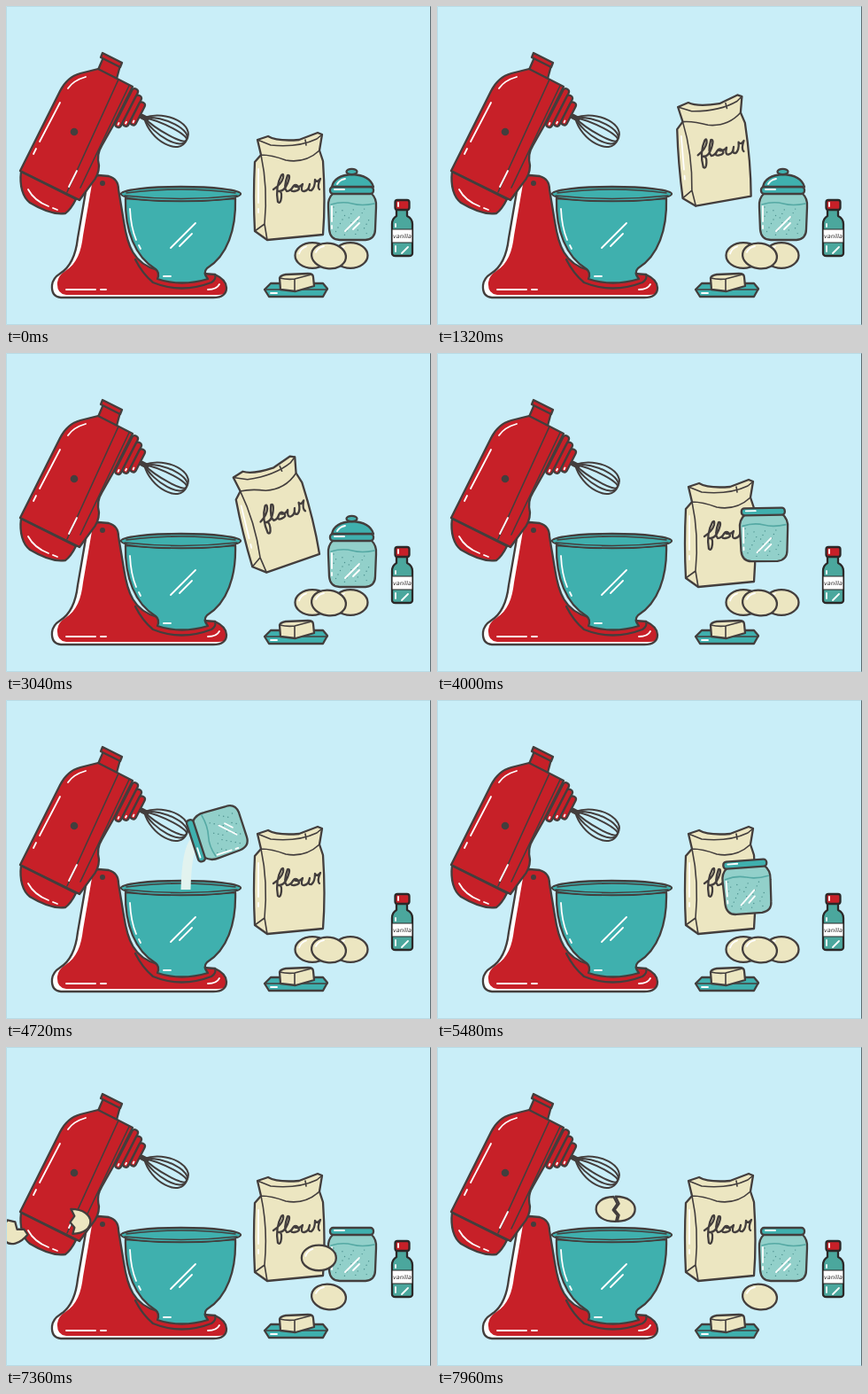
Write an HTML page that moves like this. It is 480 by 360 pixels and loops after 8 s.

```html
<!DOCTYPE html>
<html lang="en">
<head>
<meta charset="utf-8">
<title>Baking</title>
<style>
html, body { margin: 0; width: 100%; height: 100%; overflow: hidden; background: #c9eef8; }
svg { display: block; width: 100vw; height: 100vh; stroke: #433e3d; stroke-width: 2.3; stroke-linejoin: round; stroke-linecap: round; }
.red { fill: #c72028; }
.teal { fill: #3fb0ae; }
.pale { fill: #92d0ca; }
.cream { fill: #ece6c1; }
.line { fill: none; }
.thin { stroke-width: 1.6; }
.dark { fill: #433e3d; stroke: none; }
.shine { fill: none; stroke: #fff; stroke-width: 1.8; }
.plain { stroke: none; }
.stream { fill: none; stroke-width: 11; stroke-dasharray: 1 2; }
</style>
</head>
<body>
<svg viewBox="0 0 480 360">
  <defs>
    <path id="base" d="M91 204Q92 191 104 191L116 192Q127 195 127 207L133 243C137 270 144 291 171 298L236 303Q249 309 249 318Q249 329 234 329H62Q51 328 52 315Q53 307 61 302C74 294 79 280 81 262Z"/>
    <clipPath id="inBase"><use href="#base"/></clipPath>
    <clipPath id="aboveBowl"><path d="M0 0H480V214H0Z"/></clipPath>
    <g id="egg">
      <ellipse class="cream" rx="19.5" ry="14.3"/>
      <path class="shine" d="M-15 -2Q-13 -8 -7 -10"/>
    </g>
  </defs>

  <g id="mixer">
    <path class="red" d="M17 187C15 203 19 216 27 222C42 231 55 236 67 234Q73 230 79 218Z"/>
    <path class="shine" d="M25 207Q32 220 48 226M53 228L58 230"/>
    <use href="#base" fill="#fff" stroke="none"/>
    <g clip-path="url(#inBase)"><use href="#base" class="red plain" x="6" y="-3"/></g>
    <use href="#base" class="line"/>
    <path class="line" d="M146 286Q154 302 166 312Q198 325 232 312Q238 308 236 303"/>
    <path class="shine" d="M68 320H101M107 320H113M228 320Q238 320 241 314"/>
    <path class="red" d="M104 72L110 58L129 67L125 82Z"/>
    <path class="red" d="M104 71L143 91L121 135L108 158Q102 167 105 180Q105 191 97 200L83 219L16 186L61 96Q69 80 84 76Z"/>
    <path class="red" d="M109 53L131 64L129 69L107 58Z"/>
    <path class="line thin" d="M127 83L69 210M139 90L84 205M16 186L83 219"/>
    <path class="shine" d="M90 80Q76 84 70 93M61 109L38 153M34 161L31 167M71 204L80 186"/>
    <circle class="dark" cx="77" cy="142" r="4.3"/>
    <circle class="dark" cx="109" cy="200" r="3"/>
    <g id="knobs" transform="translate(133 113.5) rotate(27)"></g>
    <g id="whisk" class="line" transform="translate(156 126) rotate(28)" stroke-width="2">
      <path stroke-width="6" d="M-3 0H3"/>
    </g>
  </g>

  <g id="bowl">
    <ellipse class="teal" cx="197.500" cy="212" rx="67.500" ry="8"/>
    <path class="teal" d="M135 217C134 254 146 283 169 297Q174 301 171 308Q198 317 228 308Q222 301 227 296C250 282 260 252 259 217Q198 223 135 217Z"/>
    <path class="teal" d="M130 212C150 204 245 204 265 212Q263 220 198 220Q132 220 130 212Z" stroke="none"/>
    <path class="line thin" d="M130 212Q132 220 198 220Q263 220 265 212M134 214Q198 221 261 214"/>
    <path class="line thin" d="M136 211Q198 203 259 211"/>
    <path class="shine" d="M140 229Q141 250 147 264M150 270L152 274M178 305H186"/>
    <path class="shine" stroke-width="1" d="M186 273L214 245M196 271L210 257"/>
  </g>

  <g id="vanilla" stroke="#2b2828">
    <path fill="#4ba79d" d="M441 229V237Q436 240 436 246V279Q436 282 440 282H455Q459 282 459 279V246Q459 240 453 237V229Z"/>
    <path d="M436 252H459V267H436Z" fill="#fff" stroke-width="1.2"/>
    <rect class="red" x="439.500" y="219" width="16" height="11" rx="2.500"/>
    <path class="shine" d="M440 246V249M440 271V277M443 222V226M447 279L454 272"/>
    <text x="447.500" y="262" text-anchor="middle" font-family="'DejaVu Sans', sans-serif" font-size="6.400" font-style="italic" fill="#2b2828" stroke="none">vanilla</text>
  </g>

  <g id="butter">
    <path class="teal" d="M292 320L299 313H358L363 319L358 328H297Z"/>
    <path class="line thin" d="M292 320H363"/>
    <path class="cream" d="M309 307Q310 304 316 303L341 302Q347 302 347 306L348 316L327 322L310 320Z"/>
    <path class="line thin" d="M309 307Q318 309 326 308L345 303M326 308V321"/>
    <path class="shine" d="M299 324H306"/>
  </g>

  <g clip-path="url(#aboveBowl)">
    <path id="flourStream" class="stream" pathLength="1" stroke="#ece6c1" d="M206 142Q199 152 199 214"/>
    <path id="sugarStream" class="stream" pathLength="1" stroke="#e2f3ef" d="M213 160Q204 170 203 214"/>
    <g id="yolks" class="plain" fill="#eb9d35"></g>
  </g>

  <g id="bag">
    <path class="cream" d="M284 151L296 147Q306 153 331 151L352 143L357 145L354 163L358 175Q361 220 358 258L295 264L281 254Q279 215 281 176L288 168Z"/>
    <path class="line thin" d="M284 151L299 157Q330 160 351 150L357 145M338 151L339 157M288 168Q300 168 316 174Q338 178 354 163M288 168Q296 205 292 246L295 264M292 246L281 254"/>
    <path class="shine" d="M285 184V222M285 229V233"/>
    <path class="line" d="M302 207Q311 201 313 194Q314 188 311 191Q304 204 307 221Q310 224 311 216T307 209Q314 210 318 200T318 191Q313 205 317 209Q321 209 324 204Q327 200 330 204T326 209T325 203Q331 206 335 201Q332 210 337 209T343 201Q340 209 345 208Q349 205 349 196Q351 200 355 195Q351 204 354 207"/>
  </g>

  <g id="jar">
    <path class="pale" d="M370 211Q363 217 364 227L365 252Q366 264 377 264H406Q417 263 417 252L418 227Q419 217 412 211Z"/>
    <path class="line thin" stroke="#55a9a4" d="M367 224Q380 220 391 223T416 223"/>
    <g id="grains" fill="#4c918e" stroke="none"></g>
    <path class="shine" d="M368 226V243M368 248V251"/>
    <path class="shine" stroke-width="1" d="M383 254L399 238M392 252L399 245"/>
    <rect class="teal" x="366" y="204" width="49" height="8" rx="3.500"/>
    <path class="shine" d="M371 207H382"/>
  </g>
  <g id="lid">
    <path class="teal" d="M368 204Q371 191 391 190Q411 191 415 204Z"/>
    <ellipse class="teal" cx="390.500" cy="187" rx="6" ry="3.200"/>
    <path class="shine" d="M374 201Q377 196 383 195"/>
  </g>

  <g id="eggs"></g>
  <use href="#egg" transform="translate(364.500 282) rotate(8)"/>
  <path class="line" stroke="#5d6b70" stroke-width="1" d="M479.500 0V360"/>
  <path class="line" stroke="#b9dbe5" stroke-width="1" d="M479 .5H.5V359.500H479"/>
</svg>
<script>
const LOOP = 8000;
const byId = id => document.getElementById(id);
const add = (id, markup) => byId(id).insertAdjacentHTML('beforeend', markup);
const show = (id, on) => byId(id).setAttribute('visibility', on ? 'visible' : 'hidden');
const pose = (id, x, y, turn = 0, cx = 0, cy = 0) =>
  byId(id).setAttribute('transform', `translate(${x} ${y}) rotate(${turn} ${cx} ${cy})`);

// Eased progress from 0 to 1 between two times
function ramp(t, from, to) {
  const u = Math.min(1, Math.max(0, (t - from) / (to - from)));
  return u * u * (3 - 2 * u);
}

for (let i = 0; i < 3; i++) {
  const half = 24 - 5 * i;
  add('knobs', `<rect class="red" x="${7 * i}" y="${-half}" width="7" height="${2 * half}" rx="3"/>
    <path class="shine" d="M${7 * i + 3.5} ${half - 5}v2"/>`);
}
for (let w = 20; w > 0; w -= 7)
  add('whisk', `<path d="M0 0C18 ${-w} 56 ${-w} 54 0C56 ${w} 18 ${w} 0 0"/>`);
for (let i = 0; i < 26; i++)
  add('grains', `<circle cx="${370 + (i * 17.3) % 42}" cy="${227 + (i * 11.9) % 32}" r=".7"/>`);

const eggs = [{ x: 346, start: 5960 }, { x: 389, start: 7220 }];
const half = (id, side) =>
  `<path id="${id}" class="cream" d="M-1 -14L3 -6L-2 1L3 7L1 14C${side} 14 ${side} -14 -1 -14Z"/>`;
eggs.forEach((egg, i) => {
  add('eggs', `<g id="egg${i}"><use id="whole${i}" href="#egg"/>${half('left' + i, -28)}${half('right' + i, 28)}</g>`);
  add('yolks', `<ellipse id="yolk${i}" ry="8"/>`);
});

// Each goes up to the bowl, tips over and comes back. Sideways motion lags
// behind the lift on the way out (lag), and tipping lags behind both (tip).
const pourers = [
  { id: 'bag', stream: 'flourStream', cx: 320, cy: 205, dx: -60, dy: -80, turn: -105,
    lag: 3, tip: 1.5, out: [800, 1840], back: [2440, 3340] },
  { id: 'jar', stream: 'sugarStream', cx: 391, cy: 235, dx: -151, dy: -85, turn: -108,
    lag: 1.8, tip: 2.5, out: [3640, 4560], back: [5020, 5720] },
];

function drawPourer(p, t) {
  const away = ramp(t, ...p.back);
  const lift = ramp(t, ...p.out) - away;
  const across = away ? lift : lift ** p.lag;
  pose(p.id, p.dx * across, p.dy * lift, p.turn * across ** p.tip, p.cx, p.cy);

  const from = p.out[1] - 40, to = p.back[0] + 40;
  const flow = ramp(t, from, from + 200) + ramp(t, to - 200, to);
  byId(p.stream).setAttribute('stroke-dashoffset', 1 - flow);
  show(p.stream, t > from && t < to);
}

function drawLid(t) {
  const s = ramp(t, 3440, 3960);
  pose('lid', 54 * s, -70 * s, 40 * s, 391, 197);
  byId('lid').setAttribute('opacity', 1 - s * s);
}

function drawEgg(egg, i, t) {
  const p = t - egg.start;
  const trip = ramp(p, 0, 500), cracked = p >= 540;
  pose('egg' + i, egg.x + (205 - egg.x) * trip, 281.5 - 99 * Math.sqrt(trip));
  show('whole' + i, !cracked);
  ['left', 'right'].forEach((side, k) => {
    const gone = ramp(p, 660, 1650 + 360 * k);
    show(side + i, cracked);
    pose(side + i, -228 * gone, 25 * gone, -60 * gone * (1 - k));
  });
  pose('yolk' + i, 202, 184 + 42 * ramp(p, 740, 1080));
  byId('yolk' + i).setAttribute('rx', 2 + 7 * ramp(p, 700, 860));
  show('yolk' + i, p > 700 && p < 1080);
}

const began = performance.now();
function draw(now) {
  const t = Math.max(0, now - began) % LOOP;
  pourers.forEach(p => drawPourer(p, t));
  drawLid(t);
  eggs.forEach((egg, i) => drawEgg(egg, i, t));
  requestAnimationFrame(draw);
}
draw(began);
</script>
</body>
</html>
```
